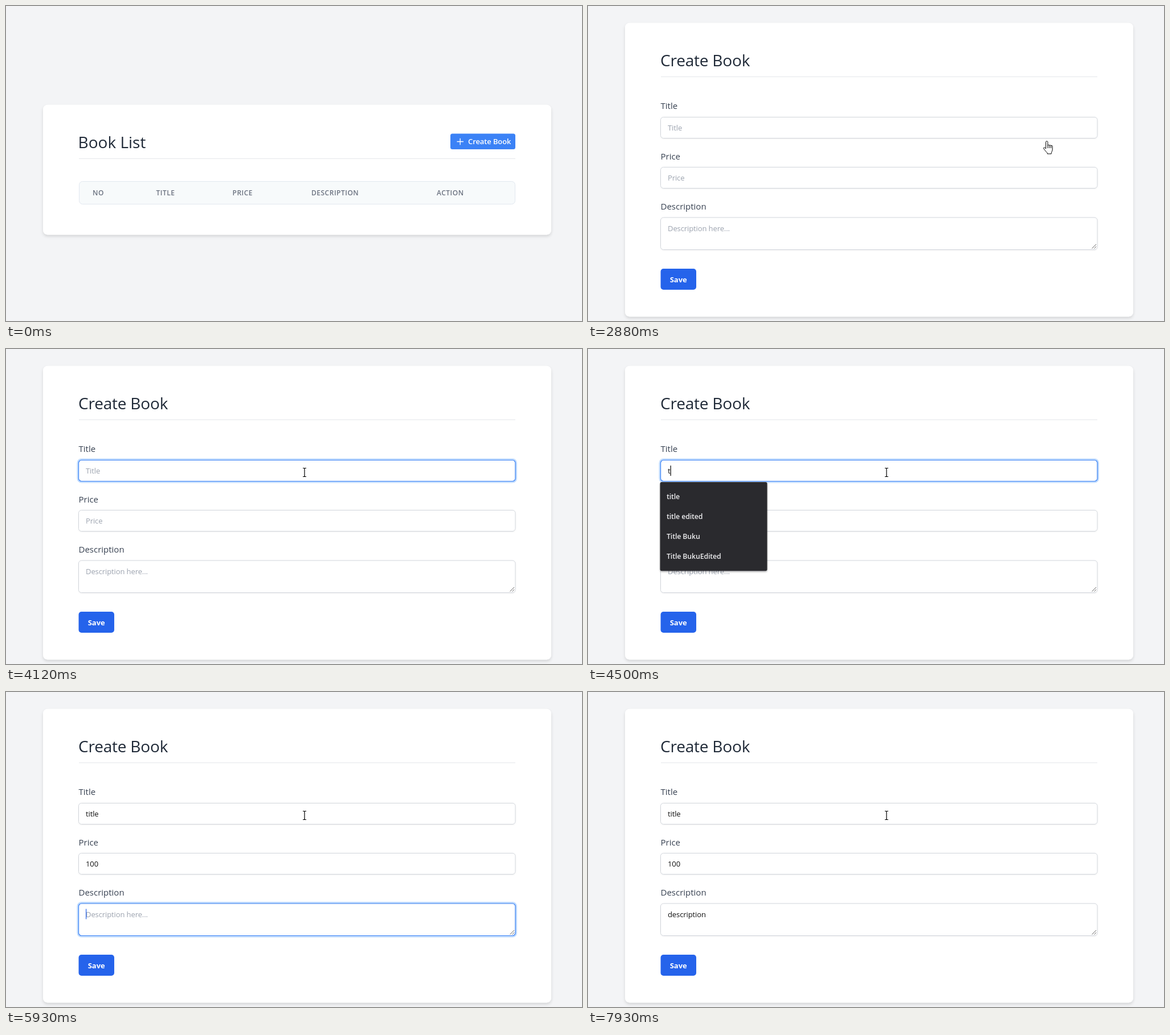
Write an HTML page that moves like this. It is 1011 px wide and 554 px high and loops after 8 s.

```html
<!DOCTYPE html>
<html lang="en">
<head>
<meta charset="utf-8">
<title>Book List</title>
<style>
  html, body { margin: 0; width: 100%; height: 100%; overflow: hidden; background: #f3f4f6; }
  svg { display: block; width: 1011px; height: 554px; }
  text { font-family: "Open Sans", "Noto Sans", sans-serif; white-space: pre; }
  .card { fill: #fff; filter: url(#cardShadow); }
  .heading { font-size: 28px; font-weight: 500; fill: #1f2937; }
  .column { font-size: 12px; font-weight: 600; letter-spacing: .5px; fill: #6b7280; }
  .label { font-size: 15px; font-weight: 500; fill: #374151; }
  .value { font-size: 13px; letter-spacing: -.1px; fill: #111; }
  .hint { fill: #9ca3af; }
  .button { font-size: 13px; font-weight: 600; letter-spacing: -.1px; fill: #fff; }
  .save { font-size: 13px; font-weight: 700; fill: #fff; }
  .item { font-size: 12.3px; font-weight: 600; letter-spacing: -.1px; fill: #eeeef0; }
  .rule { stroke: #e5e7eb; }
  .field { fill: #fff; stroke: #d1d5db; filter: url(#fieldShadow); }
  .halo { fill: none; stroke: #bfdbfe; stroke-width: 3; }
  .edge { fill: none; stroke: #3b82f6; stroke-width: 1.2; }
  .cursor { stroke: #000; stroke-linejoin: round; fill: #fff; }
</style>
</head>
<body>
<svg id="stage" viewBox="0 0 1011 554">
  <defs>
    <filter id="cardShadow" x="-5%" y="-10%" width="110%" height="125%">
      <feDropShadow dx="0" dy="3" stdDeviation="2.6" flood-opacity=".13"/>
    </filter>
    <filter id="fieldShadow" x="-2%" y="-20%" width="104%" height="150%">
      <feDropShadow dx="0" dy="1" stdDeviation=".8" flood-opacity=".06"/>
    </filter>
    <filter id="menuShadow" x="-10%" y="-10%" width="120%" height="120%">
      <feDropShadow dx="0" dy="1.5" stdDeviation="1.5" flood-opacity=".35"/>
    </filter>
  </defs>
</svg>
<script>
const LOOP = 8000;
const stage = document.getElementById('stage');

function add(parent, tag, attrs = {}, content = '') {
  const node = document.createElementNS('http://www.w3.org/2000/svg', tag);
  for (const key in attrs) node.setAttribute(key, attrs[key]);
  node.textContent = content;
  return parent.appendChild(node);
}
const group = parent => add(parent, 'g');
const text = (parent, style, x, y, content) => add(parent, 'text', { class: style, x, y }, content);
const box = (parent, x, y, width, height, rx, attrs) =>
  add(parent, 'rect', { x, y, width, height, rx, ...attrs });
const show = (node, visible) => { node.style.display = visible ? '' : 'none'; };

// Book list page
const listPage = group(stage);
box(listPage, 65, 173.7, 892, 228.6, 8, { class: 'card' });
text(listPage, 'heading', 126.5, 250, 'Book List');
add(listPage, 'path', { class: 'rule', d: 'M128 268.5H894' });
const createButton = box(listPage, 780, 224.5, 114, 27.5, 3.5);
add(listPage, 'path', { d: 'M791.5 238.5H803M797.2 232.7V244.2', stroke: '#fff', 'stroke-width': 1.3 });
text(listPage, 'button', 811, 243, 'Create Book');
box(listPage, 128.5, 308.5, 765, 40, 6, { fill: '#f7fafb', stroke: '#e2e8f0' });
[['NO', 152], ['TITLE', 263.5], ['PRICE', 397.5], ['DESCRIPTION', 536], ['ACTION', 756]]
  .forEach(([name, x]) => text(listPage, 'column', x, 333, name));

// Create form page
const formPage = group(stage);
box(formPage, 65, 29.7, 892, 516.6, 8, { class: 'card' });
text(formPage, 'heading', 127, 106, 'Create Book').style.letterSpacing = '-.2px';
add(formPage, 'path', { class: 'rule', d: 'M128 124.5H894' });

function makeField(name, hint, labelY, top, height) {
  text(formPage, 'label', 127.5, labelY, name);
  box(formPage, 127.5, top, 766.5, height, 5, { class: 'field' });
  const ring = group(formPage);
  box(ring, 126, top - 1.5, 769.5, height + 3, 6.5, { class: 'halo' });
  box(ring, 127.5, top, 766.5, height, 5, { class: 'edge' });
  const baseline = top + 23.5;
  return {
    ring,
    hint: text(formPage, 'value hint', 140, baseline, hint),
    value: text(formPage, 'value', 140, baseline, ''),
    caret: box(formPage, 140, baseline - 14, 1.2, 18, 0)
  };
}
const fields = {
  title: makeField('Title', 'Title', 181, 195.5, 37),
  price: makeField('Price', 'Price', 269.5, 283.5, 37),
  desc: makeField('Description', 'Description here...', 357.5, 372, 56.5)
};
fields.desc.caret.setAttribute('fill', '#2563eb');
add(formPage, 'path', { d: 'M884.5 426.5L892 419M888.5 426.5L892 423', stroke: '#666' });
box(formPage, 127.5, 462, 62.5, 37, 5, { fill: '#2563eb' });
text(formPage, 'save', 143.7, 485.5, 'Save');

// Suggestion menus
function makeMenu(items) {
  const menu = group(stage);
  const height = 15 + items.length * 35.3;
  box(menu, 126.5, 234, 188, height, 3, { fill: '#292a2d', filter: 'url(#menuShadow)' });
  items.forEach((item, i) => text(menu, 'item', 138, 263.5 + i * 35.3, item));
  return menu;
}
const menus = {
  all: makeMenu(['Hello World', 'title', 'title edited', 'asd', 'Est sint omnis Nam', 'Quaerat et non volup']),
  matches: makeMenu(['title', 'title edited', 'Title Buku', 'Title BukuEdited'])
};

// Cursors, each drawn around its own origin
const cursor = (d, attrs) => add(stage, 'path', { class: 'cursor', d, ...attrs });
const cursors = {
  arrow: cursor('M.5.5V16.5L4.2 13 6.8 18.5 9.2 17.5 6.7 12H11.8Z'),
  hand: cursor('M4.6 14V2.4a1.7 1.7 0 0 1 3.4 0V8.5q0-1.2 1.4-1.2t1.5 1.4q.1-1 1.4-1t1.4 1.4q.1-.8 1.2-.8t1.3 1.3V15c0 3-1.5 4.5-2 6.5V23H7.2V21.5C5 19 2.5 16.5.9 13.8c-1-1.6 1.2-2.8 2.3-1.4zM8 8.5V13M10.9 8.7V13M13.7 9.1V13'),
  beam: cursor('M-3-7.5H-1L0-6.8 1-7.5H3M0-6.8V6.8M-3 7.5H-1L0 6.8 1 7.5H3', { style: 'fill:none;stroke-width:1.2' })
};

const steps = [
  [0, { page: 'list', cursor: null, hover: false, focus: null, ring: 1, caret: true, menu: null, title: '', price: '', desc: '' }],
  [870, { cursor: ['arrow', 988, 536] }],
  [990, { cursor: ['arrow', 673, 256] }],
  [1260, { cursor: ['arrow', 716, 250] }],
  [1380, { cursor: ['hand', 784, 229], hover: true }],
  [1510, { cursor: ['hand', 792, 226] }],
  [1650, { cursor: ['hand', 797, 234] }],
  [1760, { cursor: ['hand', 799, 237] }],
  [2880, { page: 'form' }],
  [3130, { cursor: ['beam', 874, 301] }],
  [3260, { cursor: ['arrow', 690, 246] }],
  [3380, { cursor: ['beam', 524, 217] }],
  [3630, { focus: 'title', ring: .6, menu: 'all' }],
  [3760, { ring: 1 }],
  [4010, { menu: null }],
  [4120, { caret: false }],
  [4500, { caret: true, title: 't', menu: 'matches' }],
  [4620, { title: 'ti' }],
  [4760, { title: 'tit' }],
  [4870, { title: 'title' }],
  [5020, { menu: null }],
  [5140, { focus: 'price', ring: .6 }],
  [5260, { ring: 1 }],
  [5530, { price: '1' }],
  [5680, { price: '100' }],
  [5930, { focus: 'desc' }],
  [6200, { desc: 'de' }],
  [6730, { desc: 'desc' }],
  [6980, { desc: 'descr' }],
  [7270, { desc: 'descri' }],
  [7400, { desc: 'descrip' }],
  [7530, { desc: 'descripti' }],
  [7680, { desc: 'descriptio' }],
  [7790, { desc: 'description' }],
  [7930, { focus: null }]
];

function render(time) {
  const state = Object.assign({}, ...steps.filter(([at]) => at <= time).map(([, patch]) => patch));
  show(listPage, state.page === 'list');
  show(formPage, state.page === 'form');
  createButton.setAttribute('fill', state.hover ? '#1d4ed8' : '#3b82f6');

  for (const name in fields) {
    const { ring, hint, value, caret } = fields[name];
    const focused = state.focus === name;
    show(ring, focused);
    ring.style.opacity = state.ring;
    show(hint, !state[name]);
    value.textContent = state[name];
    show(caret, focused && state.caret);
    if (focused) caret.setAttribute('x', 140 + (state[name] ? value.getComputedTextLength() : 0));
  }
  for (const name in menus) show(menus[name], state.menu === name);

  const [kind, x, y] = state.cursor || [];
  for (const name in cursors) {
    show(cursors[name], name === kind);
    if (name === kind) cursors[name].setAttribute('transform', `translate(${x} ${y})`);
  }
}

const start = performance.now();
function tick() {
  render((performance.now() - start) % LOOP);
  requestAnimationFrame(tick);
}
tick();
</script>
</body>
</html>
```
